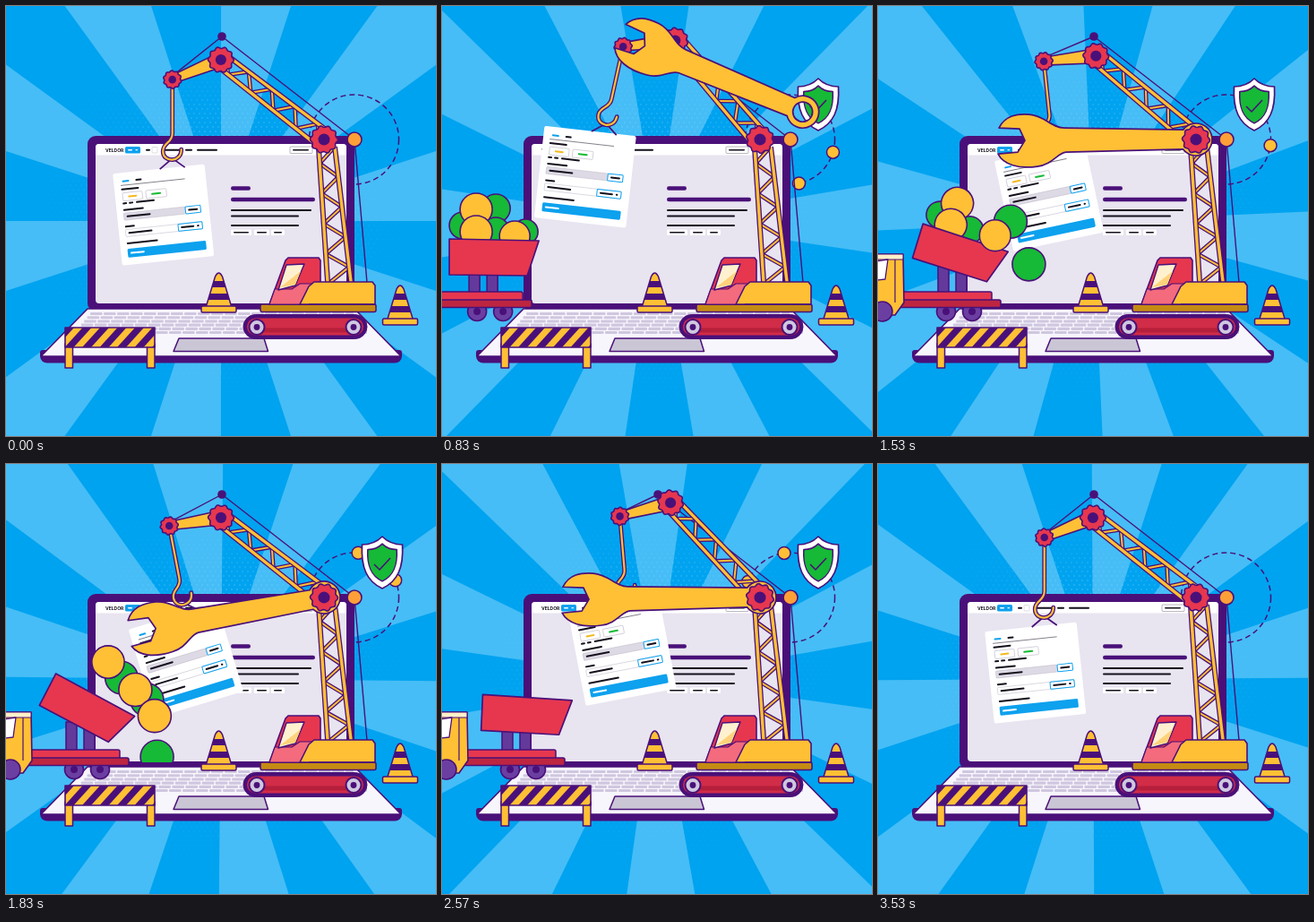
An HTML page with a canvas for the animation above (3560 ms loop, 480x480 px).

```html
<!DOCTYPE html>
<html lang="en">
<head>
<meta charset="utf-8">
<title>Site under construction</title>
<style>
html, body { margin: 0; width: 100%; height: 100%; overflow: hidden; background: #00a3f0; }
canvas { display: block; width: 480px; height: 480px; }
</style>
</head>
<body>
<canvas id="stage" width="480" height="480"></canvas>
<script>
const LOOP = 3560, TAU = Math.PI * 2, RAD = Math.PI / 180;
const INK = '#4a1079', YELLOW = '#ffc035', RED = '#e6374f', GREEN = '#16ba36', BLUE = '#0da1ee';
const ctx = document.getElementById('stage').getContext('2d');

// Smooth monotone curve through [time, value] keys, held at both ends.
function track(...keys) {
  const slope = i => (keys[i + 1][1] - keys[i][1]) / (keys[i + 1][0] - keys[i][0]);
  const tangent = i => {
    if (i === 0 || i === keys.length - 1) return 0;
    const a = slope(i - 1), b = slope(i);
    return a * b <= 0 ? 0 : 2 * a * b / (a + b);
  };
  return t => {
    if (t <= keys[0][0]) return keys[0][1];
    const i = keys.findIndex((k, n) => n < keys.length - 1 && t < keys[n + 1][0]);
    if (i < 0) return keys[keys.length - 1][1];
    const h = keys[i + 1][0] - keys[i][0], u = (t - keys[i][0]) / h, s = 1 - u;
    return (1 + 2 * u) * s * s * keys[i][1] + u * s * s * h * tangent(i)
      + u * u * (3 - 2 * u) * keys[i + 1][1] - u * u * s * h * tangent(i + 1);
  };
}

const jibAngle = track([0, 22.2], [370, 17.8], [830, 6.7], [1180, 4], [1530, 5.8], [2170, 12.8], [2930, 16.9], [LOOP, 22.2]);
const swing = track([0, 0], [370, 4.5], [860, 12.5], [1530, -6], [2080, -12.7], [2930, 0], [LOOP, 0]);
const truckX = track([0, -60], [370, 20], [830, 100], [1100, 137], [2600, 137], [2930, 78], [3300, -45], [LOOP, -60]);
const tilt = track([1050, 0], [1530, 17], [1900, 28], [2230, 28], [2650, 0]);
const wrenchX = track([430, 720], [830, 403], [1050, 355], [2850, 355], [2930, 352], [3350, -60]);
const wrenchY = track([430, -60], [830, 118], [1050, 149], [2850, 149], [2930, 147], [3350, -40]);
const wrenchTurn = track([430, 40], [830, 23], [1530, 0], [2100, -15], [2930, 15.4], [3400, 28]);
const shieldScale = track([90, 0], [270, 1.12], [350, 1], [3080, 1], [3160, 1.1], [3360, 0]);

function boomAngle(t) {
  const lift = t < LOOP / 2 ? 11.8 : 9.2;
  return 37.7 + lift * (1 - Math.cos(2 * TAU * t / LOOP)) / 2;
}

function at(x, y, degrees, draw) {
  ctx.save();
  ctx.translate(x, y);
  ctx.rotate(degrees * RAD);
  draw();
  ctx.restore();
}
function paint(fill, width = 1.6, stroke = INK) {
  if (fill) { ctx.fillStyle = fill; ctx.fill(); }
  if (width) { ctx.lineWidth = width; ctx.strokeStyle = stroke; ctx.stroke(); }
}
function poly(points, fill, width, stroke) {
  ctx.beginPath();
  for (let i = 0; i < points.length; i += 2) ctx.lineTo(points[i], points[i + 1]);
  ctx.closePath();
  paint(fill, width, stroke);
}
function box(x, y, w, h, r, fill, width, stroke) {
  ctx.beginPath();
  ctx.roundRect(x, y, w, h, r);
  paint(fill, width, stroke);
}
function disc(x, y, r, fill, width, stroke) {
  ctx.beginPath();
  ctx.arc(x, y, r, 0, TAU);
  paint(fill, width, stroke);
}
function line(x1, y1, x2, y2, width, color = INK) {
  ctx.beginPath();
  ctx.moveTo(x1, y1);
  ctx.lineTo(x2, y2);
  paint(null, width, color);
}
const dash = (x1, x2, y, color = '#15101c', h = 2) => box(x1, y - h / 2, x2 - x1, h, h / 2, color, 0);

function makeDots() {
  const layer = document.createElement('canvas');
  layer.width = layer.height = 480;
  const c = layer.getContext('2d');
  c.fillStyle = 'rgba(150,222,255,.42)';
  for (let row = 0; row < 96; row++) {
    for (let col = 0; col < 80; col++) {
      const x = col * 6 + (row % 2) * 3, y = row * 5;
      const r = 1.5 * (1 - Math.hypot(x - 240, y - 240) / 235);
      if (r <= 0.12) continue;
      c.beginPath();
      c.arc(x, y, r, 0, TAU);
      c.fill();
    }
  }
  return layer;
}
const dots = makeDots();

function background(t) {
  ctx.fillStyle = '#00a3f0';
  ctx.fillRect(0, 0, 480, 480);
  at(240, 240, 36 * t / LOOP, () => {
    for (let i = 0; i < 10; i++) {
      ctx.beginPath();
      ctx.moveTo(0, 0);
      ctx.arc(0, 0, 350, (36 * i - 18) * RAD, 36 * i * RAD);
      paint('#46bdf6', 0);
    }
  });
  ctx.drawImage(dots, 0, 0);
}

function orbit(t) {
  ctx.setLineDash([6, 4]);
  disc(388.5, 149, 50, null, 1.5);
  ctx.setLineDash([]);
  for (const start of [100.5, 162.5]) {
    const a = (start - 360 * t / LOOP) * RAD;
    disc(388.5 + 50 * Math.cos(a), 149 + 50 * Math.sin(a), 7, YELLOW, 1.5);
  }
}

function shieldPath(k) {
  ctx.beginPath();
  ctx.moveTo(0, -29 * k);
  ctx.quadraticCurveTo(9 * k, -20 * k, 22.5 * k, -20 * k);
  ctx.bezierCurveTo(24 * k, 6 * k, 17 * k, 21 * k, 0, 29 * k);
  ctx.bezierCurveTo(-17 * k, 21 * k, -24 * k, 6 * k, -22.5 * k, -20 * k);
  ctx.quadraticCurveTo(-9 * k, -20 * k, 0, -29 * k);
  ctx.closePath();
}
function shield(t) {
  const k = shieldScale(t);
  if (k < 0.02) return;
  at(420, 110, 0, () => {
    ctx.scale(k, k);
    shieldPath(1);
    paint('#fff', 1.7);
    shieldPath(0.72);
    paint(GREEN, 1.5);
    ctx.beginPath();
    ctx.moveTo(-9, 2);
    ctx.lineTo(-3, 8);
    ctx.lineTo(9, -5);
    paint(null, 1.6);
  });
}

function laptop() {
  box(91, 145, 298, 196, 9, INK, 0);
  box(100, 154, 280, 178, 4, '#e8e4f0', 0);
  box(100, 154, 280, 12.5, [4, 4, 0, 0], '#fff', 0);

  ctx.fillStyle = '#15101c';
  ctx.font = 'bold 5px Inter, sans-serif';
  ctx.fillText('VELDOR', 111, 162.8);
  box(133, 157, 17, 7.5, 1.5, BLUE, 0);
  dash(136, 141, 160.7, '#fff', 1.5);
  dash(144.5, 147, 160.7, '#fff', 1.2);
  dash(156, 161, 160.7);
  box(163, 157.5, 6, 6.5, 1, null, 0.6, '#c9c4d4');
  dash(175, 196, 160.7);
  dash(200, 208, 160.7);
  dash(213, 236, 160.7);
  box(317, 157, 25, 7.5, 1, '#fff', 0.6, '#8d8798');
  dash(320, 338, 160.7, '#15101c', 1.6);

  dash(251, 273, 203.5, INK, 4.5);
  dash(251, 345, 216, INK, 4.5);
  dash(251, 341, 228, '#15101c', 2);
  dash(251, 327, 234.5, '#15101c', 2);
  dash(251, 327, 245, '#15101c', 2);
  for (const [x, w] of [[251, 23], [277, 17], [296, 15]]) {
    box(x, 249.5, w, 6.5, 1, '#fff', 0);
    dash(x + 3, x + w - 3, 252.8, '#15101c', 1.6);
  }

  box(38, 384, 404, 14.5, [3, 3, 8, 8], INK, 0);
  poly([91, 338, 389, 338, 441, 391, 39, 391], '#f8f6fd', 1.7);
  for (let row = 0; row < 6; row++) {
    const y = 342 + row * 4.2, left = 94 - row * 3.4, right = 388 + row * 3;
    for (let x = left; x < right - 4; x += 15) box(x, y, Math.min(13.6, right - x), 3.1, 1, '#cfc7df', 0);
  }
  poly([193, 371, 288, 371, 292.5, 385.5, 187, 385.5], '#cbc6d6', 1.5);
}

function barricade() {
  for (const x of [66, 157.5]) box(x, 377, 8.5, 27, 0, YELLOW, 1.5);
  ctx.save();
  ctx.beginPath();
  ctx.rect(66, 359, 100, 22);
  ctx.clip();
  ctx.fillStyle = YELLOW;
  ctx.fillRect(66, 359, 100, 22);
  for (let x = 46; x < 170; x += 19.5) poly([x, 381, x + 10, 381, x + 30, 359, x + 20, 359], INK, 0);
  ctx.restore();
  box(66, 359, 100, 22, 0, null, 1.6);
}

function cone(x, y) {
  at(x, y, 0, () => {
    ctx.beginPath();
    ctx.moveTo(-4, 3);
    ctx.quadraticCurveTo(0, -5, 4, 3);
    ctx.lineTo(14, 36);
    ctx.lineTo(-14, 36);
    ctx.closePath();
    paint(YELLOW, 0);
    for (const y1 of [8, 22]) {
      const a = 3 + y1 * 0.305, b = a + 2.1;
      poly([-a, y1, a, y1, b, y1 + 7, -b, y1 + 7], INK, 0);
    }
    ctx.beginPath();
    ctx.moveTo(-14, 36);
    ctx.lineTo(-4, 3);
    ctx.quadraticCurveTo(0, -5, 4, 3);
    ctx.lineTo(14, 36);
    paint(null, 1.5);
    box(-19.5, 36, 39, 7, 1.5, YELLOW, 1.5);
  });
}

function bar(x1, y1, x2, y2, width) {
  line(x1, y1, x2, y2, width);
  line(x1, y1, x2, y2, width - 2.6, YELLOW);
}
// Lattice girder along x from 0 to len, with half-widths a and b at its ends.
function truss(len, a, b, bays) {
  const half = i => a + (b - a) * i / bays;
  for (let i = 0; i < bays; i++) {
    const side = i % 2 ? 1 : -1;
    bar(len * i / bays, side * half(i), len * (i + 1) / bays, -side * half(i + 1), 4.6);
  }
  bar(0, -a, len, -b, 6);
  bar(0, a, len, b, 6);
}

function gear(x, y, r, turn) {
  ctx.beginPath();
  for (let i = 0; i <= 80; i++) {
    const a = i / 80 * TAU, k = r + r * 0.07 * Math.cos(10 * a);
    ctx.lineTo(x + k * Math.cos(a + turn * RAD), y + k * Math.sin(a + turn * RAD));
  }
  ctx.closePath();
  paint(RED, 1.6);
  disc(x, y, r * 0.45, INK, 0);
}

function card() {
  box(-51.5, -51.5, 103, 103, 2, '#fff', 0);
  dash(-42, -34, -42, BLUE);
  dash(-27, -20, -42);
  line(-44, -37.5, 28, -37.5, 0.8, '#6d6775');
  dash(-44, -24, -33);
  box(-43, -29, 22, 9, 1, '#fff', 0.6, '#bbb5c5');
  dash(-37, -27, -24.5, '#f5b921');
  box(-17, -29, 23, 9, 1, '#fff', 0.6, '#bbb5c5');
  dash(-11, 0, -24.5, GREEN);
  dash(-44, -39, -17.3);
  dash(-37, -32, -17.3);
  dash(-29, -8, -17.3);
  dash(-44, -21, -10);
  box(-44, -6.5, 69, 8, 1, '#dedae5', 0.5, '#bbb5c5');
  dash(-41, -14, -2.5);
  box(25, -6.5, 17, 8, 1, '#fff', 1, BLUE);
  dash(28, 39, -2.5);
  dash(-44, -33, 8.7);
  box(-44, 12, 86, 8, 1, '#fff', 0.5, '#bbb5c5');
  dash(-41, -14, 16);
  box(15, 12, 27, 8, 1, '#fff', 1, BLUE);
  dash(18, 33, 16);
  dash(36, 38.5, 16);
  dash(-44, -9, 27.5);
  box(-44, 33.5, 88, 10, 1.5, BLUE, 0);
  dash(-41, -25, 38.5, '#fff');
}

function hookAndCard(x, y, degrees) {
  at(x, y, degrees, () => {
    at(-10, 151, -6, card);
    ctx.beginPath();
    ctx.moveTo(-14, 100);
    ctx.lineTo(0, 88);
    ctx.lineTo(14, 98);
    paint(null, 1.8);
    ctx.lineCap = 'round';
    ctx.beginPath();
    ctx.moveTo(0, 5);
    ctx.lineTo(0, 60);
    ctx.bezierCurveTo(0, 71, -10.5, 70, -10.5, 80);
    ctx.bezierCurveTo(-10.5, 93, 10, 93, 10, 78);
    paint(null, 4.8);
    paint(null, 2.2, YELLOW);
    ctx.lineCap = 'butt';
  });
}

function crane(t) {
  const a = boomAngle(t), b = jibAngle(t);
  const x1 = 355 - 145.5 * Math.cos(a * RAD), y1 = 149 - 145.5 * Math.sin(a * RAD);
  const x2 = x1 - 58.5 * Math.cos(b * RAD), y2 = y1 + 58.5 * Math.sin(b * RAD);

  line(241, 34, 389, 149, 1.4);
  line(241, 34, x2, y2 - 4, 1.4);
  line(389, 149, 403, 309, 1.4);
  at(358, 158, Math.atan2(150, 14) / RAD, () => truss(152, 9, 13, 9));
  at(355, 149, 180 + a, () => truss(145, 10, 8, 9));
  hookAndCard(x2, y2, swing(t));
  at(x1, y1, -b, () => poly([0, -8, 0, 8, -58, 4.5, -58, -4.5], YELLOW, 1.6));
  disc(241, 34, 4.8, INK, 0);
  gear(x1, y1, 13.5, a);
  gear(x2, y2, 9.5, -b);
}

function craneBody() {
  box(265, 344.5, 138, 27, 13.5, INK, 1);
  box(269, 348.5, 130, 19, 9.5, '#d12c48', 0);
  line(284, 362, 386, 362, 5, '#b51f3b');
  for (const x of [280, 388]) {
    disc(x, 358.5, 8.5, '#cfc7df', 2);
    disc(x, 358.5, 3.4, INK, 0);
  }
  box(284, 333, 129, 8.5, 2, '#c68b12', 1.5);
  ctx.lineJoin = 'round';
  poly([294, 333, 312, 284, 315, 281, 349, 281, 351, 284, 351, 333], RED, 1.6);
  poly([294, 333, 300, 316, 319, 316, 328, 310, 346, 310, 336, 333], '#f36b7d', 1.2);
  poly([304, 317, 313, 289, 333, 288, 323, 312], '#fff1cf', 1.4);
  poly([306, 314, 329, 296, 323, 311], '#ffd27a', 0);
  poly([328, 333, 338, 313, 344, 308, 409, 308, 412, 312, 412, 333], YELLOW, 1.6);
  line(338, 333, 412, 333, 1.4);
}

function wrench(t) {
  at(wrenchX(t), wrenchY(t), wrenchTurn(t), () => {
    ctx.beginPath();
    ctx.arc(0, 0, 18, Math.PI + 0.65, Math.PI - 0.65);
    ctx.lineTo(-145, 14);
    ctx.bezierCurveTo(-155, 15, -160, 28, -177, 30);
    ctx.bezierCurveTo(-198, 33, -215, 28, -221, 16);
    ctx.lineTo(-199, 14);
    ctx.lineTo(-191, 1);
    ctx.lineTo(-197, -12);
    ctx.lineTo(-220, -13);
    ctx.bezierCurveTo(-213, -27, -200, -29, -186, -28);
    ctx.bezierCurveTo(-169, -27, -162, -13, -147, -13);
    ctx.closePath();
    ctx.moveTo(11, 0);
    ctx.arc(0, 0, 11, 0, TAU, true);
    ctx.fillStyle = YELLOW;
    ctx.fill('evenodd');
    paint(null, 1.7);
  });
}

// Coins: resting place relative to the bucket hinge, radius, colour, take-off time.
const coins = [
  [-7, -43, 16, GREEN, 1335], [-44, -24, 15, GREEN, 1655], [26, -17, 14, GREEN, 1150],
  [-7, -18, 15, GREEN, 1550], [-29, -42, 18, YELLOW, 1770], [-29, -17, 18, YELLOW, 1600],
  [14, -12, 17, YELLOW, 1480]
];
const refill = 2800;

function truck(t) {
  const right = truckX(t), angle = tilt(t);
  at(right, 0, 0, () => {
    for (const x of [-132, -61, -32]) {
      disc(x, 341, 10.5, '#6b3fa2', 1.6);
      disc(x, 341, 4, INK, 0);
    }
    for (const x of [-70, -50]) box(x, 288, 12, 34, 0, '#633a9c', 1.5);
    box(-170, 319, 160, 10, 2, RED, 1.5);
    box(-170, 328, 170, 8.5, 2, '#bd2541', 1.6);
    poly([-170, 277, -109, 277, -108, 331, -118, 345, -170, 345], YELLOW, 1.6);
    poly([-170, 277, -109, 277, -109, 283, -170, 283], '#fff0c9', 1);
    poly([-146, 286, -126, 283, -129, 305, -146, 307], '#fff', 1.3);
    line(-118, 283, -118, 331, 1.2);
    disc(-132, 341, 11, '#6b3fa2', 1.6);
  });
  at(right - 33, 269, angle, () => {
    if (t < 2000) {
      for (const [x, y, r, color, start] of coins) if (t < start) disc(x, y, r, color, 1.6);
    }
    poly([-59, -9, 41, -7, 28, 32, -59, 31], RED, 1.7);
  });
}

function fallingCoins(t) {
  const angle = tilt(t) * RAD;
  ctx.save();
  ctx.beginPath();
  ctx.rect(0, 0, 480, 333);
  ctx.clip();
  for (const [x, y, r, color, start] of coins) {
    const u = (t - start) / 560, s = 1 - u;
    if (u < 0 || u > 1.15) continue;
    const px = 104 + x * Math.cos(angle) - y * Math.sin(angle);
    const py = 269 + x * Math.sin(angle) + y * Math.cos(angle);
    const size = r + (18.5 - r) * Math.min(1, u * 3);
    disc(s * s * px + 2 * u * s * 178 + u * u * 167, s * s * py + 2 * u * s * 224 + u * u * 355, size, color, 1.6);
  }
  ctx.restore();
}

function render(t) {
  ctx.lineJoin = 'round';
  background(t);
  orbit(t);
  shield(t);
  laptop();
  cone(237.5, 299);
  cone(440, 313);
  crane(t);
  craneBody();
  truck(t);
  fallingCoins(t);
  barricade();
  wrench(t);
  disc(389, 149, 8, '#ff9f38', 1.6);
  gear(355, 149, 14.5, boomAngle(t));
}

const began = performance.now();
function tick() {
  render((performance.now() - began) % LOOP);
  requestAnimationFrame(tick);
}
tick();
</script>
</body>
</html>
```
